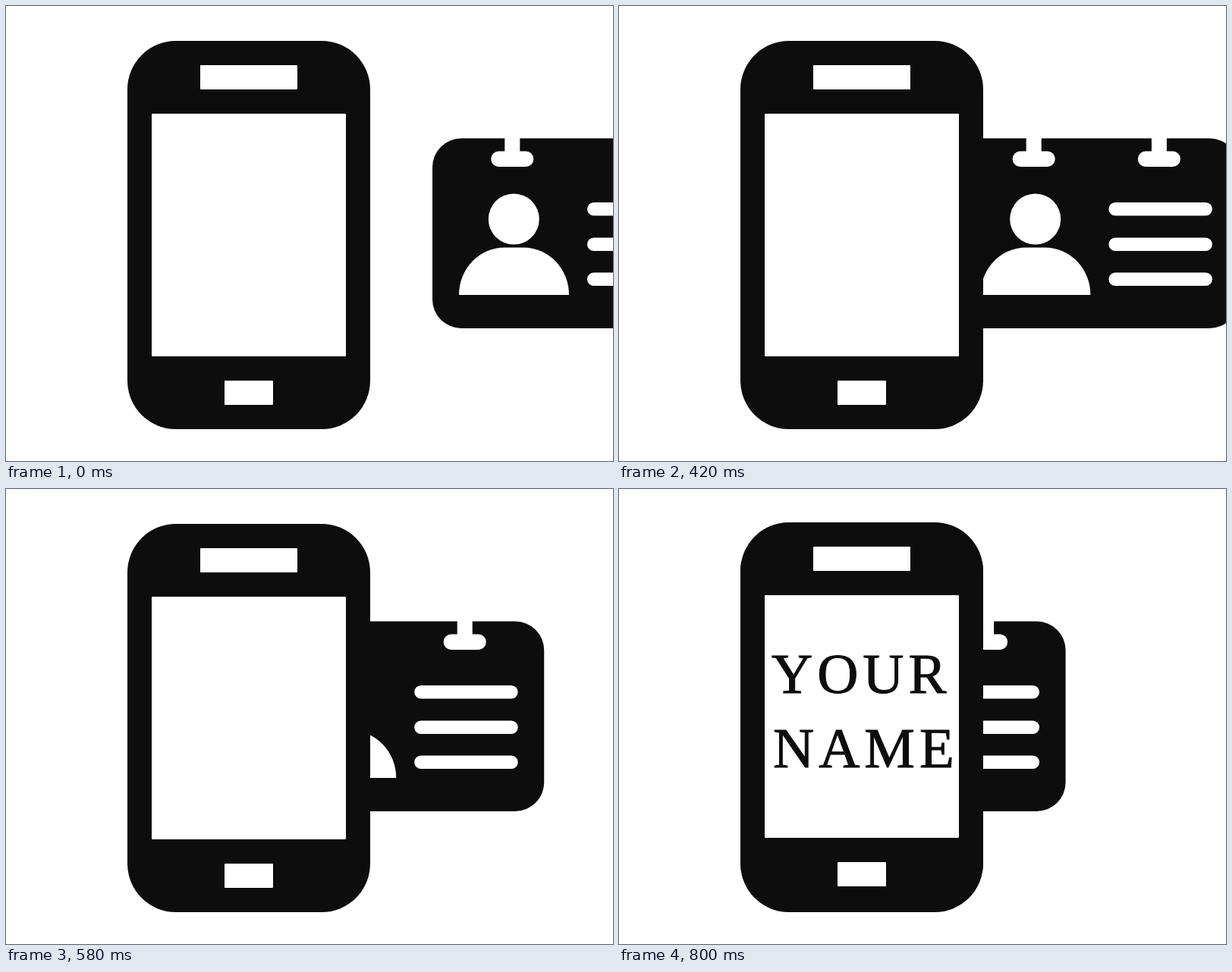
Recreate the animation shown at these times as an HTML page. Size 800x600 px, loop 1380 ms.

```html
<!DOCTYPE html>
<html lang="en">
<head>
<meta charset="utf-8">
<title>Card into phone</title>
<style>
  html, body { margin: 0; width: 100%; height: 100%; overflow: hidden; background: #fff; }
  svg { display: block; width: 800px; height: 600px; }
  text {
    font: 75px "Liberation Serif", "Times New Roman", serif;
    letter-spacing: 6px;
    fill: #0d0d0d;
    stroke: #0d0d0d;
  }
</style>
</head>
<body>
<svg viewBox="0 0 800 600">
  <defs>
    <g id="phone" fill="#fff">
      <rect x="160" width="320" height="512" rx="64" fill="#0d0d0d"/>
      <rect x="256" y="32" width="128" height="32" rx="1"/>
      <rect x="192" y="96" width="256" height="320" rx="1"/>
      <rect x="288" y="448" width="64" height="32" rx="1"/>
    </g>
    <g id="slot">
      <rect x="-10" y="172" width="20" height="30"/>
      <rect x="-28" y="191.5" width="56" height="20.5" rx="10"/>
    </g>
    <rect id="line" x="204" width="136.5" height="17.5" rx="8.75"/>
  </defs>

  <g id="card" fill="#fff">
    <rect y="174.5" width="375" height="250.5" rx="38" fill="#0d0d0d"/>
    <use href="#slot" x="105.3"/>
    <use href="#slot" x="270.5"/>
    <circle cx="107.3" cy="281" r="33.5"/>
    <path d="M35 381A60 62.5 0 0 1 95 318.5H120A60 62.5 0 0 1 180 381Z"/>
    <use href="#line" y="259"/>
    <use href="#line" y="305.5"/>
    <use href="#line" y="351.5"/>
  </g>

  <use href="#phone" y="46"/>
  <g id="named">
    <use href="#phone" y="44"/>
    <text x="201" y="268.5">YOUR</text>
    <text x="203" y="367">NAME</text>
  </g>
</svg>
<script>
  const LOOP = 1380, TICK = 20, START_TICK = 12;
  const card = document.getElementById("card");
  const named = document.getElementById("named");
  const clamp = (v, lo, hi) => Math.min(hi, Math.max(lo, v));

  function draw() {
    const time = performance.now() % LOOP;
    const step = Math.floor(time / TICK) - START_TICK;
    // The card slides for 26 steps; the named screen fades in over steps 18 to 28.
    const x = 562 - 13.4 * clamp(step, 0, 26);
    card.setAttribute("transform", `translate(${x} 0)`);
    named.setAttribute("opacity", clamp((step - 18) / 10, 0, 1));
    requestAnimationFrame(draw);
  }
  draw();
</script>
</body>
</html>
```
